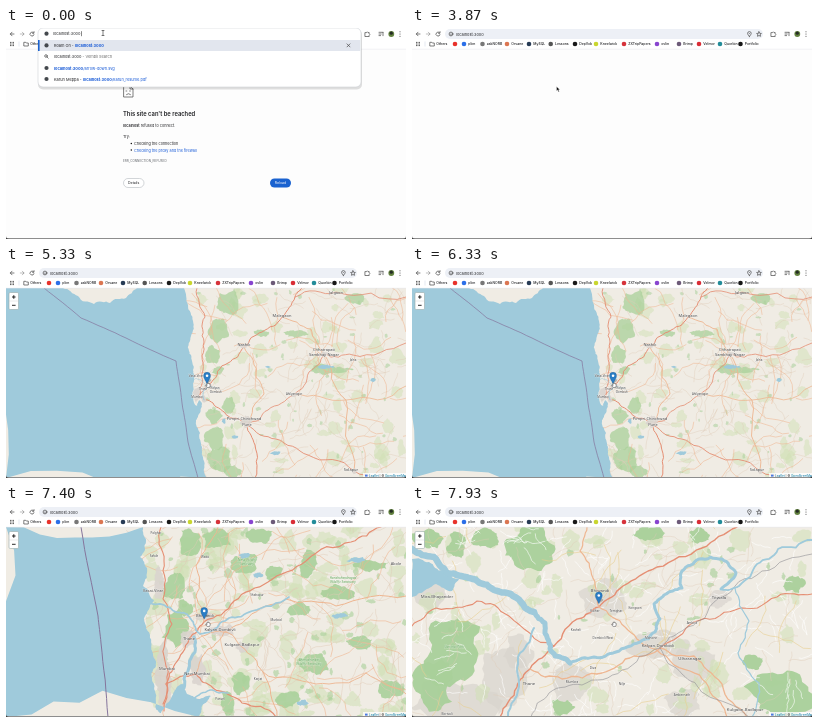
An HTML page that plays this animation: 400x211 px, repeating every 8000 ms.

```html
<!DOCTYPE html>
<html lang="en">
<head>
<meta charset="utf-8">
<title>Map page</title>
<style>
  html, body { margin: 0; width: 100%; height: 100%; overflow: hidden; background: #fdfdfd; }
  svg { display: block; width: 100vw; height: 100vh; }
  text { font-family: Inter, Roboto, sans-serif; fill: #202124; }
  .map text { font-family: "Noto Sans", "Open Sans", sans-serif; text-anchor: middle; fill: #444;
    stroke: #fff; stroke-opacity: .6; stroke-width: .7; paint-order: stroke; }
  .map text.park { fill: #4f9a45; font-style: italic; }
  .map path { stroke-linejoin: round; stroke-linecap: round; }
  .link { fill: #1558d6; }
  .credit { fill: #0078a8; }
  .icon { fill: none; stroke: #474747; stroke-width: .7; stroke-linecap: round; }
</style>
</head>
<body>
<svg id="stage" viewBox="0 0 400 211" preserveAspectRatio="none">
  <rect width="400" height="211" fill="#fdfdfd"/>

  <g id="error">
    <path class="icon" d="M118 58h6l3 3v8h-9zM124 58v3h3M120 63h.8M123.6 63h.8M120.5 66.5q2-1.8 4 0"/>
    <text x="117" y="88" font-size="5.8" font-weight="600">This site can't be reached</text>
    <g font-size="3.75">
      <text x="117" y="99.3"><tspan font-weight="600">localhost</tspan> refused to connect.</text>
      <text x="117" y="110">Try:</text>
      <circle cx="125.3" cy="115.5" r=".7"/><circle cx="125.3" cy="122" r=".7"/>
      <text x="128" y="117">Checking the connection</text>
      <text x="128" y="123.5" class="link">Checking the proxy and the firewall</text>
    </g>
    <text x="117" y="134" font-size="3.1" style="fill:#5f6368">ERR_CONNECTION_REFUSED</text>
    <g font-size="3.5" text-anchor="middle">
      <rect x="117.5" y="150.5" width="20.5" height="9" rx="4.5" fill="#fff" stroke="#b5bac0" stroke-width=".6"/>
      <text x="127.7" y="156.3">Details</text>
      <rect x="264" y="150.5" width="21" height="9" rx="4.5" fill="#1a62d0"/>
      <text x="274.5" y="156.3" style="fill:#fff">Reload</text>
    </g>
  </g>

  <g id="mapPage">
    <g id="levels"></g>
    <g id="pin">
      <ellipse cx="2.6" cy="-1.6" rx="3.2" ry="1.2" fill="#333" opacity=".28" transform="rotate(-28)"/>
      <path d="M0 0C-1-3-3.4-5-3.4-8a3.4 3.4 0 0 1 6.8 0C3.4-5 1-3 0 0z" fill="#2a7dc5" stroke="#2367a3" stroke-width=".5"/>
      <circle cy="-8" r="1.3" fill="#fff"/>
    </g>
    <rect x="3" y="25.5" width="9.5" height="17" rx="1.2" fill="#fff" stroke="#9aa" stroke-width=".6"/>
    <path d="M3 34h9.5" stroke="#ccc" stroke-width=".4"/>
    <path d="M6 30h3.6M7.8 28.2v3.6M6 38.3h3.6" stroke="#111" stroke-width=".9"/>
    <rect x="357" y="206" width="43" height="5" fill="#fff" opacity=".78"/>
    <rect x="359" y="207.6" width="2.6" height="2" fill="#4c7be1"/>
    <text x="363" y="209.8" font-size="3"><tspan class="credit">Leaflet</tspan> | © <tspan class="credit">OpenStreetMap</tspan></text>
  </g>

  <g id="toolbar">
    <rect width="400" height="21" fill="#fff"/>
    <path d="M0 21.2h400" stroke="#e3e5e8" stroke-width=".5"/>
    <path class="icon" d="M8 6H4.3M6 4.2 4.3 6 6 7.8"/>
    <path class="icon" d="M14.3 6H18M16.3 4.2 18 6 16.3 7.8" opacity=".5"/>
    <path class="icon" d="M27.6 4.8A2 2 0 1 0 28 6.6M28 3.6v1.6h-1.6"/>
    <rect x="33" y="1" width="318" height="10" rx="5" fill="#edf0f6"/>
    <circle cx="39" cy="6" r="1.9" class="icon"/><path class="icon" d="M39 5.9v1"/>
    <text x="44" y="7.5" font-size="3.95">localhost:3000</text>
    <path class="icon" d="M337.4 8.4q-1.8-1.8-1.8-3a1.8 1.8 0 0 1 3.6 0q0 1.2-1.8 3zM337.4 5.4v.1"/>
    <path class="icon" d="m347 3.8.7 1.5 1.7.2-1.2 1.1.3 1.7-1.5-.8-1.5.8.3-1.7-1.2-1.1 1.7-.2z"/>
    <path class="icon" d="M359.3 4.6h1.3q.7-1.6 1.4 0h1.2v1.3q1.3.7 0 1.4v1.2h-3.9z"/>
    <path class="icon" d="M373 4.3h4M373 6h2.2M373 7.6h1.6M377 4.5v3.2"/>
    <circle cx="385.3" cy="6" r="2.9" fill="#62813f"/><circle cx="385.3" cy="5.2" r="1.6" fill="#252c25"/>
    <path d="M394 3.8v.01M394 6v.01M394 8.2v.01" stroke="#444" stroke-width="1.1" stroke-linecap="round"/>
    <path d="M4 14.4h4M4 16h4M4 17.6h4" stroke="#555" stroke-width="1" stroke-dasharray="1 .5"/>
    <path d="M13 13.5v5" stroke="#c9d2e3" stroke-width=".5"/>
    <path class="icon" d="M18.2 14.3h1.5l.6.7h2v3h-4.1z"/>
    <g id="bookmarks" font-size="3.45" font-weight="500"></g>
  </g>

  <g id="suggestions">
    <rect x="32" y="1.5" width="324" height="60" rx="5" fill="#000" opacity=".12"/>
    <rect x="32" y="0" width="323" height="59" rx="5" fill="#fff" stroke="#c4c8ce" stroke-width=".5"/>
    <rect x="32.3" y="12" width="322" height="11" fill="#e2e6ee"/>
    <rect x="32" y="12" width="1.6" height="11" fill="#1a62d0"/>
    <g fill="#44484d">
      <circle cx="40.5" cy="5.7" r="2.1"/><circle cx="40.5" cy="17.4" r="2.1"/>
      <circle cx="40.5" cy="40" r="2.1"/><circle cx="40.5" cy="51" r="2.1"/>
    </g>
    <circle cx="40" cy="28" r="1.3" class="icon"/><path class="icon" d="m41 29 1.2 1.2M341 15.9l3 3M344 15.9l-3 3"/>
    <g font-size="3.9">
      <text x="47" y="7.3">localhost:3000</text>
      <path d="M75.5 3.2v5" stroke="#111" stroke-width=".5"/>
      <text x="48" y="19">Roam On - <tspan class="link" font-weight="700">localhost:3000</tspan></text>
      <text x="48" y="30">localhost:3000<tspan fill="#666"> - Vembil Search</tspan></text>
      <text x="48" y="41.5" class="link"><tspan font-weight="700">localhost:3000</tspan>/arrow-down.svg</text>
      <text x="48" y="52.5">Karun Meppa - <tspan class="link"><tspan font-weight="700">localhost:3000</tspan>/karun_resume.pdf</tspan></text>
    </g>
  </g>

  <path d="M0 210.5h400" stroke="#8d8d8d" stroke-width="1"/>
  <path d="M0 208v3h3q-3 0-3-3zM400 208v3h-3q3 0 3-3z" fill="#333"/>

  <g id="cursor">
    <path id="beam" class="icon" d="M-1-2.5h2M0-2.5v5M-1 2.5h2"/>
    <path id="arrow" d="M0 0v4.6l1.1-1 .8 1.8.9-.4-.8-1.7h1.5z" fill="#111" stroke="#fff" stroke-width=".4"/>
    <path id="hand" d="M-1.6 1.8-2.3.2q.2-.8.9 0l.3.4V-1.4q.4-.7.8 0v-.5q.5-.6.9 0v.4q.5-.4.8.2v.5q.5-.3.8.3v1.4L1.6 2.4h-2.6z" fill="#fff" stroke="#222" stroke-width=".45"/>
  </g>
</svg>

<script>
const LOOP = 8000, FOCUS = [202, 118];
const $ = id => document.getElementById(id);

let seed = 7;
const rnd = (lo = 0, hi = 1) => {
  seed = (seed * 16807) % 2147483647;
  return lo + (hi - lo) * seed / 2147483647;
};
const points = s => s.split(' ').map(p => p.split(',').map(Number));

// Subdivides a polyline and pushes every new midpoint sideways.
function rough(pts, amount, steps = 3) {
  for (let n = 0; n < steps; n++) {
    pts = pts.flatMap((p, i) => {
      const q = pts[i + 1];
      if (!q) return [p];
      const k = rnd(-amount, amount);
      return [p, [(p[0] + q[0]) / 2 - (q[1] - p[1]) * k, (p[1] + q[1]) / 2 + (q[0] - p[0]) * k]];
    });
  }
  return 'M' + pts.map(p => p.map(v => v.toFixed(1)).join(' ')).join('L');
}
const line = (s, color, width, amount = .12) =>
  `<path d="${rough(points(s), amount)}" fill="none" stroke="${color}" stroke-width="${width}"/>`;
const area = (s, color, amount = .14) =>
  `<path d="${rough(points(s), amount)}Z" fill="${color}"/>`;

function blob(x, y, rx, ry, color, opacity = 1) {
  const ring = Array.from({ length: 11 }, (_, i) => {
    const a = i * Math.PI * 2 / 11, r = rnd(.65, 1.15);
    return [x + Math.cos(a) * rx * r, y + Math.sin(a) * ry * r];
  });
  return `<path d="${rough([...ring, ring[0]], .22, 2)}Z" fill="${color}" opacity="${opacity}"/>`;
}
const blobs = (s, color, opacity) => points(s).map(b => blob(...b, color, opacity)).join('');
const scatter = (n, x0, x1, size, color, opacity) => Array.from({ length: n }, () =>
  blob(rnd(x0, x1), rnd(21, 211), rnd(.3, 1) * size, rnd(.3, 1) * size, color, opacity)).join('');

function lanes(n, x0, length, color, width) {
  let d = '';
  for (let i = 0; i < n; i++) {
    let x = rnd(x0, 400), y = rnd(21, 211), a = rnd(0, 6.3);
    const walk = [[x, y]];
    for (let k = 0; k < 4; k++) {
      a += rnd(-.6, .6);
      walk.push([x += Math.cos(a) * length, y += Math.sin(a) * length]);
    }
    d += rough(walk, .15, 1);
  }
  return `<path d="${d}" fill="none" stroke="${color}" stroke-width="${width}"/>`;
}
const labels = (s, size, cls = '') => s.split(';').map(item => {
  const [x, y, name] = item.split(',');
  return `<text x="${x}" y="${y}" font-size="${size}" class="${cls}">${name}</text>`;
}).join('');

const SEA = '#9fcadb', LAND = '#f0ece4', WOOD = '#a9d09a', MEADOW = '#cfe0b4',
  TRUNK = '#e58f74', MAIN = '#eeb691', LANE = '#dfc9b5', TOWN = '#d9d4ce', BORDER = '#85759c';
const ground = `<rect y="21" width="400" height="190" fill="${LAND}"/>`;

const coastView = () => ground
  + scatter(70, 190, 400, 9, MEADOW, .5)
  + scatter(60, 190, 400, 3, WOOD, .55)
  + blobs('222,36,13,14 213,62,11,13 207,88,8,10 212,104,7,5 207,148,9,9 208,170,11,13 214,192,12,14 226,204,9,8 222,138,7,8 256,66,8,4 325,103,24,5 350,32,12,6 290,67,12,4', WOOD, .75)
  + lanes(110, 182, 7, LANE, .4) + lanes(55, 182, 12, MAIN, .55)
  + line('193,128 205,116 222,96 238,80 256,65 276,50 289,30 296,21', TRUNK, 1)
  + line('193,129 207,136 222,149 241,158 249,178 249,211', TRUNK, 1)
  + line('241,158 270,172 302,188 348,204 400,211', TRUNK, .9)
  + line('241,158 262,143 288,128 303,105 318,87 347,88 400,76', TRUNK, .8)
  + line('238,80 250,110 258,127 241,158', MAIN, .9)
  + line('191,21 199,50 198,75 197,103 194,128', TRUNK, .9)
  + line('276,50 305,62 318,87 340,133 348,204', MAIN, .9)
  + line('289,30 330,25 400,30', TRUNK, .8)
  + line('288,128 340,133 400,119', MAIN, .8)
  + blobs('191,127,4,8 202,119,4,3 198,132,3,4 240,155,6,6 238,79,4,3 318,87,4,3 348,204,3,3 288,128,3,2', TOWN, .9)
  + area('0,21 57,21 72,29 88,37 104,36 120,31 131,21 178,21 182,38 187,54 185,69 183,84 186,94 187,103 188,114 187,124 188,136 191,139 193,133 196,137 193,147 190,153 194,166 196,180 198,194 201,211 0,211 0,21', SEA)
  + line('198,133 197,124 202,119', SEA, .9)
  + line('186,112 195,113 202,119 213,122', SEA, .6)
  + blobs('320,100,9,2 262,100,3,1 270,186,6,2 229,170,3,2 218,154,2,3 367,113,3,2', SEA)
  + line('38,21 75,51 120,71 170,94 176,136 182,175 192,211', BORDER, .7, .01)
  + labels('330,27,Jalgaon;276,50,Malegaon;238,79,Nashik;318,84,Chhatrapati;318,89,Sambhaji Nagar;238,153,Pimpri-Chinchwad;241,159,Pune;345,204,Solapur', 4)
  + labels('190,110,Vasai-Virar;197,122.5,Thane;191,131,Mumbai;209,122,Kalyan;210,126,Dombivli;288,128,Ahilyanagar;347,94,Jalna', 2.9);

const cityView = () => ground
  + scatter(95, 140, 400, 14, MEADOW, .55)
  + scatter(75, 145, 400, 5, WOOD, .6)
  + blobs('167,82,12,17 179,103,9,9 171,125,14,20 184,37,12,15 210,33,16,11 239,58,14,12 255,29,14,8 268,67,10,7 302,58,10,13 294,104,13,8 332,86,18,8 308,157,15,12 281,193,13,8 235,177,9,13 355,137,14,7 366,60,18,6 221,196,8,12 385,183,13,10', WOOD, .9)
  + lanes(110, 145, 9, LANE, .45) + lanes(50, 150, 15, MAIN, .6)
  + blobs('157,160,9,30 158,190,6,16 192,165,9,18 215,125,17,7 199,111,9,5 182,133,8,10 153,78,6,17 236,141,8,5', TOWN, .9)
  + line('158,205 160,178 169,158 183,133 198,116 228,95 262,76 300,55 345,36 375,21', TRUNK, 1.2)
  + line('160,178 190,168 207,182 236,197 270,211', TRUNK, 1.2)
  + line('155,21 158,55 157,93 166,118 159,155 157,198', TRUNK, 1.1)
  + line('183,133 200,129 218,126 242,112 280,93 330,100 400,90', MAIN, 1)
  + line('190,168 202,143 218,126 236,141 257,166 271,211', MAIN, 1)
  + line('198,116 190,90 190,60 212,21', MAIN, 1)
  + line('257,166 310,178 360,167 400,188', MAIN, .9)
  + area('0,21 137,21 140,35 134,51 141,62 137,80 148,94 144,99 139,110 144,129 147,148 150,160 146,173 149,185 150,203 155,207 160,198 166,190 171,181 178,178 181,188 192,193 205,190 196,200 193,211 0,211 0,21', SEA)
  + line('178,182 182,165 189,146 188,131', SEA, 3)
  + line('141,98 158,99 170,106 181,108 188,119 194,128 207,124 223,112 246,105 283,91', SEA, 1.7)
  + line('187,193 204,184 222,187', SEA, 1.5)
  + blobs('239,50,6,3 252,69,5,3 352,54,11,3 333,110,8,3 297,197,6,3', SEA)
  + line('75,21 92,110 95,137 102,211', BORDER, 1, .01)
  + labels('147,86,Vasai-Virar;199,111,Bhiwandi;214,125,Kalyan-Dombivli;183,134,Thane;161,164,Mumbai;191,169,Navi Mumbai;236,140,Kulgaon-Badlapur;390,59,Akole', 4.1)
  + labels('150,28,Palghar;148,51,Safale;199,52,Wada;251,90,Shahapur;270,115,Murbad;252,174,Karjat;214,194,Panvel', 3)
  + labels('241,55,Tansa Wildlife;241,59,Sanctuary;337,73,Harishchandragad;337,77,Wildlife Sanctuary;303,155,Bhimashankar;303,159,Wildlife Sanctuary', 3.2, 'park');

const riverView = () => ground
  + blobs('45,195,50,25 90,175,28,38 193,92,27,21 160,177,22,20 250,140,38,17 284,160,25,23 270,196,22,14 18,90,18,16 307,93,13,10 106,145,14,18', TOWN, .7)
  + scatter(65, 0, 400, 13, MEADOW, .55)
  + scatter(35, 0, 400, 5, WOOD, .65)
  + blobs('42,143,32,43 20,180,22,27 118,43,27,24 73,33,14,10 45,40,10,13 236,27,16,8 370,188,35,23 340,157,12,8 17,33,19,10 287,29,10,8 382,78,11,9 150,201,12,8', WOOD, .95)
  + lanes(190, 0, 5, '#fff', .6) + lanes(100, 0, 8, LANE, .4) + lanes(28, 0, 14, '#e7ce91', .6)
  + line('88,211 105,181 118,163 142,140 170,112 187,101 211,80 245,61 290,42 325,21', TRUNK, 1.4)
  + line('118,163 150,173 190,167 222,150 248,142 282,150 310,178 335,211', MAIN, 1.3)
  + line('0,120 24,102 65,95 97,110 142,140', TRUNK, 1.1)
  + line('187,101 213,121 239,142 278,165 305,193 315,211', MAIN, 1.2)
  + line('187,101 181,72 168,45 175,21', MAIN, 1.2)
  + line('248,142 282,116 323,104 365,91 400,88', TRUNK, 1.1)
  + line('119,211 137,187 170,179 210,164 248,142 270,125 307,92 350,65 400,48', '#8f8f94', .6)
  + line('248,142 270,168 293,188 337,211', '#8f8f94', .6)
  + area('0,53 17,56 31,65 47,73 40,85 24,78 12,85 0,91 0,53', SEA)
  + line('0,43 22,51 35,67 61,73 79,82 101,90 122,106', SEA, 6.5)
  + line('122,106 133,117 137,137 143,150 158,157', SEA, 5)
  + line('158,157 182,151 204,146 228,136 243,126 248,113 242,98 252,89 270,82 270,65 287,53 310,53 324,67 309,83', SEA, 3)
  + line('309,83 327,80 345,58 366,43 400,34', SEA, 1.8)
  + line('122,122 108,147 107,176 96,211', SEA, 2)
  + line('323,82 337,115 326,147 347,177 340,211', SEA, 1.2)
  + labels('188,86,Bhiwandi;246,141,Kalyan-Dombivli;278,154,Ulhasnagar;117,179,Thane;25,92,Mira-Bhayander;333,205,Kulgaon-Badlapur;307,93,Titwala', 4.3)
  + labels('183,106,Kalher;204,106,Temghar;223,103,Kongaon;164,125,Kasheli;191,133,Dombivli West;239,133,Mohone;280,118,Ambivli;270,190,Ambernath;181,163,Diva;160,177,Mumbra;210,179,Nilje;35,209,Borivali', 3.1)
  + labels('42,142,National Park', 3.2, 'park');

$('levels').innerHTML = [coastView, cityView, riverView]
  .map(draw => `<g class="map">${draw()}</g>`).join('');
const levels = [...$('levels').children];

// Each bookmark: icon x, icon colour, text.
const bookmarks = [
  [20, '', 'Others'], [43, '#e8322b', ''], [52, '#2b6fe8', 'plim'], [70.5, '#777', 'askNORB'],
  [95, '#db7652', 'Orvane'], [117, '#273b55', 'MySQL'], [138.7, '#555', 'Lessons'],
  [163, '#191919', 'DepVob'], [184, '#c9d62f', 'Kneelwick'], [212, '#d6333b', 'ZXTripPapers'],
  [245, '#8845cf', 'ovlin'], [267, '#6c5a78', 'Brimp'], [287, '#d92d36', 'Velmor'],
  [308, '#238c99', 'Quorbin'], [328.5, '#161616', 'Portfolio']
];
$('bookmarks').innerHTML = bookmarks.map(([x, color, name]) =>
  (color && `<circle cx="${x}" cy="16" r="2.3" fill="${color}"/>`)
  + `<text x="${x + 4.3}" y="17.2">${name}</text>`).join('');

const clamp = v => Math.min(1, Math.max(0, v));
const ramp = (t, from, to) => clamp((t - from) / (to - from));
const easeOut = p => 1 - (1 - p) ** 3;
const smooth = p => p * p * (3 - 2 * p);
const show = (id, on) => { $(id).style.display = on ? '' : 'none'; };

// Cursor moves: start, end, x, y.
const moves = [[70, 330, 102, 13], [600, 1070, 113, 29], [1600, 2000, 118.5, 35],
  [2530, 3200, 135, 51], [3470, 3870, 144.5, 58.5], [4130, 4930, 196, 111], [5000, 5300, 202, 118]];
function cursorAt(t) {
  let [x, y] = [97, 5];
  for (const [from, to, nx, ny] of moves) {
    const p = smooth(ramp(t, from, to));
    x += (nx - x) * p;
    y += (ny - y) * p;
  }
  return [x, y];
}

function render(t) {
  const typing = t < 70, mapShown = t >= 4130;
  show('error', typing);
  show('suggestions', typing);
  show('mapPage', mapShown);
  show('beam', typing);
  show('arrow', !typing && !mapShown);
  show('hand', mapShown);
  $('cursor').setAttribute('transform', `translate(${cursorAt(t)})`);
  if (!mapShown) return;

  const depth = easeOut(ramp(t, 6930, 7180)) + easeOut(ramp(t, 7600, 7850));
  const opacity = [1, ramp(t, 7150, 7330), ramp(t, 7800, 7920)];
  $('mapPage').style.opacity = ramp(t, 4130, 4380);
  levels.forEach((level, i) => {
    const k = 4 ** (depth - i);
    level.setAttribute('transform',
      `translate(${FOCUS[0] * (1 - k)} ${FOCUS[1] * (1 - k)}) scale(${k})`);
    level.style.opacity = opacity[i];
    level.style.display = opacity[i] && opacity[i + 1] !== 1 ? '' : 'none';
  });
  const s = 4 ** depth;
  $('pin').setAttribute('transform', `translate(${FOCUS[0] - .95 * s} ${FOCUS[1] - 1.28 * s})`);
}

const start = performance.now();
(function tick() {
  render((performance.now() - start) % LOOP);
  requestAnimationFrame(tick);
})();
</script>
</body>
</html>
```
